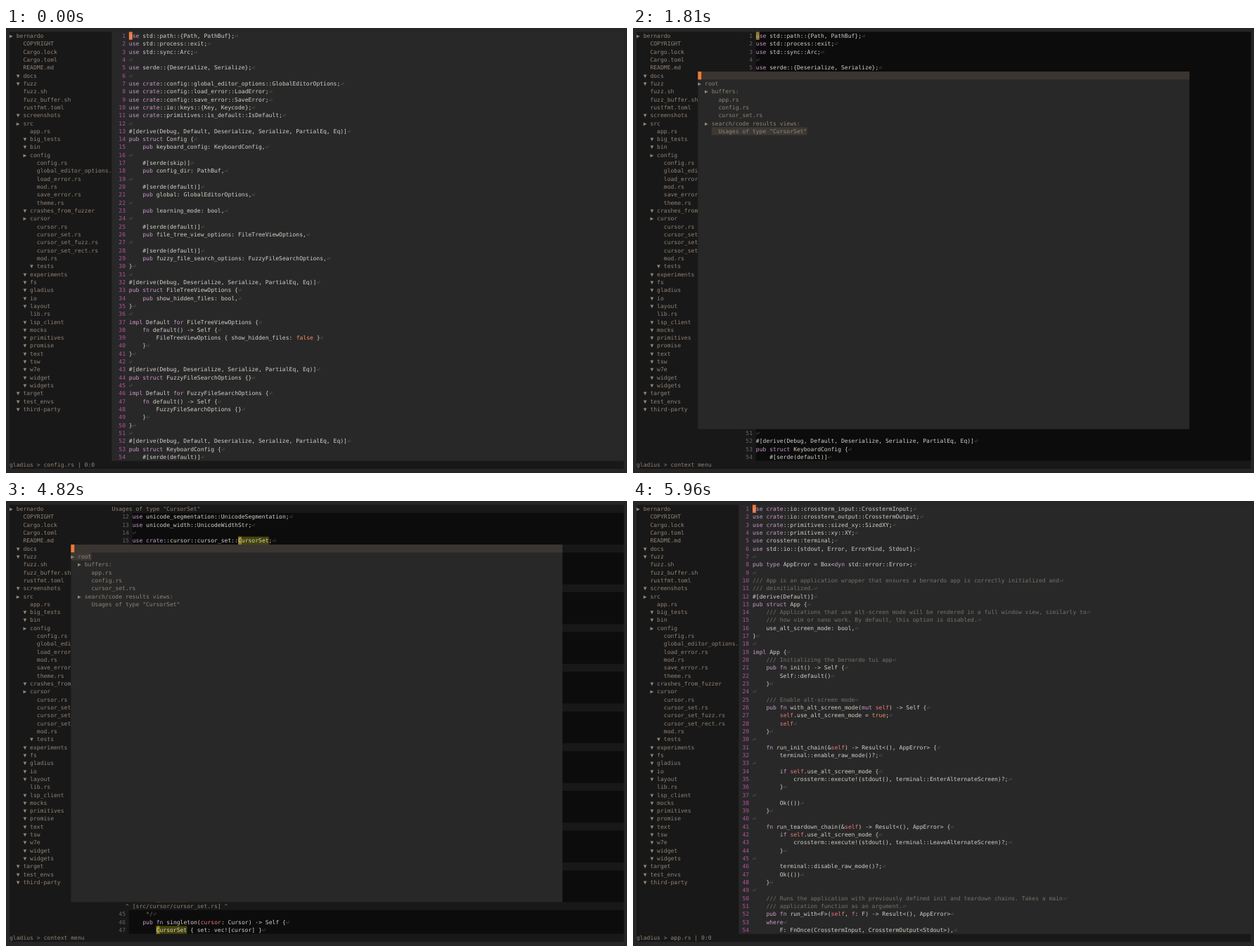
These frames come from a looping animation (883 px wide and 634 px high, 7760 ms). An HTML page with a canvas:

```html
<!DOCTYPE html>
<html lang="en">
<head>
<meta charset="utf-8">
<title>Terminal editor</title>
<style>
  html, body { margin: 0; width: 100%; height: 100%; overflow: hidden; background: #262627; }
  canvas { display: block; }
</style>
</head>
<body>
<canvas id="stage" width="883" height="634"></canvas>
<script>
const ctx = document.getElementById('stage').getContext('2d');
const LOOP = 7760;
const CW = 4.853, RH = 11.32, X0 = 5, Y0 = 5.5;
const COLS = 180, SIDE = 30, STATUS = 54;

const C = {
  frame: '#262627', panel: '#181818', focus: '#282828', idle: '#0c0c0c',
  input: '#3a3531', pick: '#3c3835', cursor: '#f07a35', idleCursor: '#8a7d1e',
  match: '#45450c', hot: '#9c3a06', tree: '#928374', text: '#d3d0c8',
  keyword: '#cc99cc', variable: '#f2777a', constant: '#f99157',
  comment: '#747369', eol: '#686868', num: '#b452a4', idleNum: '#666666'
};

const TREE = `▶ bernardo
    COPYRIGHT
    Cargo.lock
    Cargo.toml
    README.md
  ▼ docs
  ▼ fuzz
    fuzz.sh
    fuzz_buffer.sh
    rustfmt.toml
  ▼ screenshots
  ▶ src
      app.rs
    ▼ big_tests
    ▼ bin
    ▶ config
        config.rs
        global_editor_options.rs
        load_error.rs
        mod.rs
        save_error.rs
        theme.rs
    ▼ crashes_from_fuzzer
    ▶ cursor
        cursor.rs
        cursor_set.rs
        cursor_set_fuzz.rs
        cursor_set_rect.rs
        mod.rs
      ▼ tests
    ▼ experiments
    ▼ fs
    ▼ gladius
    ▼ io
    ▼ layout
      lib.rs
    ▼ lsp_client
    ▼ mocks
    ▼ primitives
    ▼ promise
    ▼ text
    ▼ tsw
    ▼ w7e
    ▼ widget
    ▼ widgets
  ▼ target
  ▼ test_envs
  ▼ third-party`.split('\n');

const CONFIG = `use std::path::{Path, PathBuf};
use std::process::exit;
use std::sync::Arc;

use serde::{Deserialize, Serialize};

use crate::config::global_editor_options::GlobalEditorOptions;
use crate::config::load_error::LoadError;
use crate::config::save_error::SaveError;
use crate::io::keys::{Key, Keycode};
use crate::primitives::is_default::IsDefault;

#[derive(Debug, Default, Deserialize, Serialize, PartialEq, Eq)]
pub struct Config {
    pub keyboard_config: KeyboardConfig,

    #[serde(skip)]
    pub config_dir: PathBuf,

    #[serde(default)]
    pub global: GlobalEditorOptions,

    pub learning_mode: bool,

    #[serde(default)]
    pub file_tree_view_options: FileTreeViewOptions,

    #[serde(default)]
    pub fuzzy_file_search_options: FuzzyFileSearchOptions,
}

#[derive(Debug, Deserialize, Serialize, PartialEq, Eq)]
pub struct FileTreeViewOptions {
    pub show_hidden_files: bool,
}

impl Default for FileTreeViewOptions {
    fn default() -> Self {
        FileTreeViewOptions { show_hidden_files: false }
    }
}

#[derive(Debug, Deserialize, Serialize, PartialEq, Eq)]
pub struct FuzzyFileSearchOptions {}

impl Default for FuzzyFileSearchOptions {
    fn default() -> Self {
        FuzzyFileSearchOptions {}
    }
}

#[derive(Debug, Default, Deserialize, Serialize, PartialEq, Eq)]
pub struct KeyboardConfig {
    #[serde(default)]`.split('\n');

const APP = `use crate::io::crossterm_input::CrosstermInput;
use crate::io::crossterm_output::CrosstermOutput;
use crate::primitives::sized_xy::SizedXY;
use crate::primitives::xy::XY;
use crossterm::terminal;
use std::io::{stdout, Error, ErrorKind, Stdout};

pub type AppError = Box<dyn std::error::Error>;

/// App is an application wrapper that ensures a bernardo app is correctly initialized and
/// deinitialized.
#[derive(Default)]
pub struct App {
    /// Applications that use alt-screen mode will be rendered in a full window view, similarly to
    /// how vim or nano work. By default, this option is disabled.
    use_alt_screen_mode: bool,
}

impl App {
    /// Initializing the bernardo tui app
    pub fn init() -> Self {
        Self::default()
    }

    /// Enable alt-screen mode
    pub fn with_alt_screen_mode(mut self) -> Self {
        self.use_alt_screen_mode = true;
        self
    }

    fn run_init_chain(&self) -> Result<(), AppError> {
        terminal::enable_raw_mode()?;

        if self.use_alt_screen_mode {
            crossterm::execute!(stdout(), terminal::EnterAlternateScreen)?;
        }

        Ok(())
    }

    fn run_teardown_chain(&self) -> Result<(), AppError> {
        if self.use_alt_screen_mode {
            crossterm::execute!(stdout(), terminal::LeaveAlternateScreen)?;
        }

        terminal::disable_raw_mode()?;
        Ok(())
    }

    /// Runs the application with previously defined init and teardown chains. Takes a main
    /// application function as an argument.
    pub fn run_with<F>(self, f: F) -> Result<(), AppError>
    where
        F: FnOnce(CrosstermInput, CrosstermOutput<Stdout>),`.split('\n');

// Each usage: first line number, text column, file, code.
const USAGES = [
  [12, 36, 'text/buffer_state', `use unicode_segmentation::UnicodeSegmentation;
use unicode_width::UnicodeWidthStr;

use crate::cursor::cursor_set::CursorSet;`],
  [347, 36, 'text/buffer_state', `    }

    // WidgetId should correspond to EditorWidget and NOT EditorView.
    pub fn cursors(&self, widget_id: WID) -> Option<&CursorSet> {`],
  [352, 36, 'text/buffer_state', `    }

    // WidgetId should correspond to EditorWidget and NOT EditorView.
    pub fn cursors_mut(&mut self, widget_id: WID) -> Option<&mut CursorSet> {`],
  [644, 36, 'text/buffer_state', `        &self.subtype
    }

    pub fn initialize_for_widget(&mut self, widget_id: WID, cursors_op: Option<CursorSet>) -> bool {`],
  [645, 36, 'text/buffer_state', `    }

    pub fn initialize_for_widget(&mut self, widget_id: WID, cursors_op: Option<CursorSet>) -> bool {
        let cursor_set = cursors_op.unwrap_or(CursorSet::single());`],
  [4, 35, 'widgets/edit_box', `
use crate::config::config::ConfigRef;
use crate::config::theme::Theme;
use crate::cursor::cursor_set::CursorSet;`],
  [150, 35, 'widgets/edit_box', `    }

    pub fn set_cursor_end(&mut self) {
        let mut cursor_set = CursorSet::single();`],
  [29, 35, 'cursor/cursor_set', `    set: Vec<Cursor>,
}

impl CursorSet {`],
  [31, 35, 'cursor/cursor_set', `
impl CursorSet {
    pub fn single() -> Self {
        CursorSet {`],
  [37, 35, 'cursor/cursor_set', `    }

    pub fn new(set: Vec<Cursor>) -> Self {
        CursorSet { set }`],
  [45, 35, '', `     */
    pub fn singleton(cursor: Cursor) -> Self {
        CursorSet { set: vec![cursor] }`]
];

const MENU = ['▶ root', '  ▶ buffers:', '      app.rs', '      config.rs', '      cursor_set.rs',
  '  ▶ search/code results views:', '      Usages of type "CursorSet"'];

// Start time, view, selected menu row (-1: menu closed).
const SCENES = [
  [0, 'config', -1], [510, 'config', 0], [840, 'config', 1], [1050, 'config', 2],
  [1200, 'config', 3], [1450, 'config', 4], [1620, 'config', 5], [1810, 'config', 6],
  [2100, 'usages', -1], [4820, 'usages', 0], [5430, 'usages', 1], [5630, 'usages', 2],
  [5960, 'app', -1]
];

const TOKEN = /(\/\/.*|\*\/)|\b(use|crate|pub|struct|impl|for|fn|let|mut|type|dyn|where|if)\b|(\bself\b|(?<=[(,] ?)\w+(?=: ))|\b(true|false)\b/g;
const TOKEN_COLORS = [C.comment, C.keyword, C.variable, C.constant];

function box(col, row, cols, rows, color) {
  ctx.fillStyle = color;
  ctx.fillRect(X0 + col * CW, Y0 + row * RH, cols * CW, rows * RH);
}

function write(str, col, row, color) {
  if (!str.trim()) return;
  ctx.fillStyle = color;
  ctx.fillText(str, X0 + col * CW, Y0 + row * RH + 8.5);
}

function writeCode(line, col, row) {
  let at = 0;
  for (const m of line.matchAll(TOKEN)) {
    write(line.slice(at, m.index), col + at, row, C.text);
    write(m[0], col + m.index, row, TOKEN_COLORS[m.slice(1).findIndex(Boolean)]);
    at = m.index + m[0].length;
  }
  write(line.slice(at), col + at, row, C.text);
  write('⏎', col + line.length, row, C.eol);
}

function writeNumber(n, col, row, focused) {
  const s = String(n);
  write(s, col - 1 - s.length, row, focused ? C.num : C.idleNum);
}

function drawTree() {
  box(0, 0, SIDE, STATUS, C.panel);
  ctx.save();
  ctx.beginPath();
  ctx.rect(0, 0, X0 + SIDE * CW, 634);
  ctx.clip();
  TREE.forEach((s, row) => {
    const indent = s.search(/\S/);
    write(s.slice(indent), indent, row, C.tree);
  });
  ctx.restore();
}

function drawFile(lines, col, focused) {
  box(SIDE, 0, COLS - SIDE, STATUS, focused ? C.focus : C.panel);
  if (!focused) box(col, 0, COLS - col, STATUS, C.idle);
  box(col, 0, 1, 1, focused ? C.cursor : C.idleCursor);
  lines.forEach((line, row) => {
    writeNumber(row + 1, col, row, focused);
    writeCode(line, col, row);
  });
}

function drawUsages(focused) {
  box(SIDE, 0, COLS - SIDE, STATUS, C.panel);
  write('Usages of type "CursorSet"', SIDE, 0, C.tree);
  USAGES.forEach(([first, col, file, code], i) => {
    const lines = code.split('\n'), top = 1 + i * 5, last = lines.length - 1;
    const active = focused && i === 1;
    if (active) {
      box(SIDE, top, COLS - SIDE, 4, '#29282d');
      box(SIDE, top + 4, 34, 1, C.focus);
    } else {
      box(col, top, COLS - col, lines.length, C.idle);
    }
    const hit = col + lines[last].indexOf('CursorSet');
    box(hit, top + last, 9, 1, active ? C.hot : C.match);
    box(hit, top + last, 1, 1, active ? C.cursor : C.idleCursor);
    lines.forEach((line, j) => {
      writeNumber(first + j, col, top + j, active);
      writeCode(line, col, top + j);
    });
    if (file) write(`^ [src/${file}.rs] ^`, 34, top + 4, C.tree);
  });
}

function drawMenu(selected) {
  const left = 18, top = 5;
  box(left, top, 144, 45, C.focus);
  box(left, top, 144, 1, C.input);
  box(left, top, 1, 1, C.cursor);
  MENU.forEach((s, i) => {
    const indent = s.search(/\S/), row = top + 1 + i;
    const start = s.includes('▶') ? indent : indent - 2;
    if (i === selected) box(left + start, row, s.length - start, 1, C.pick);
    write(s.slice(indent), left + indent, row, C.tree);
  });
}

function draw(view, selected) {
  const focused = selected < 0;
  ctx.fillStyle = C.frame;
  ctx.fillRect(0, 0, 883, 634);
  ctx.font = `${CW / 0.60205}px "DejaVu Sans Mono", monospace`;
  ctx.textRendering = 'geometricPrecision';
  drawTree();
  if (view === 'usages') drawUsages(focused);
  else if (view === 'config') drawFile(CONFIG, 35, focused);
  else drawFile(APP, 34, focused);
  if (!focused) drawMenu(selected);
  box(0, STATUS, COLS, 1, C.panel);
  const place = !focused ? ' > context menu' : view === 'usages' ? '' : ` > ${view}.rs | 0:0`;
  write('gladius' + place, 0, STATUS, C.tree);
}

let shown = null;
function tick() {
  const t = performance.now() % LOOP;
  const scene = SCENES.findLast(s => s[0] <= t);
  if (scene !== shown) {
    draw(scene[1], scene[2]);
    shown = scene;
  }
  requestAnimationFrame(tick);
}
tick();
</script>
</body>
</html>
```
